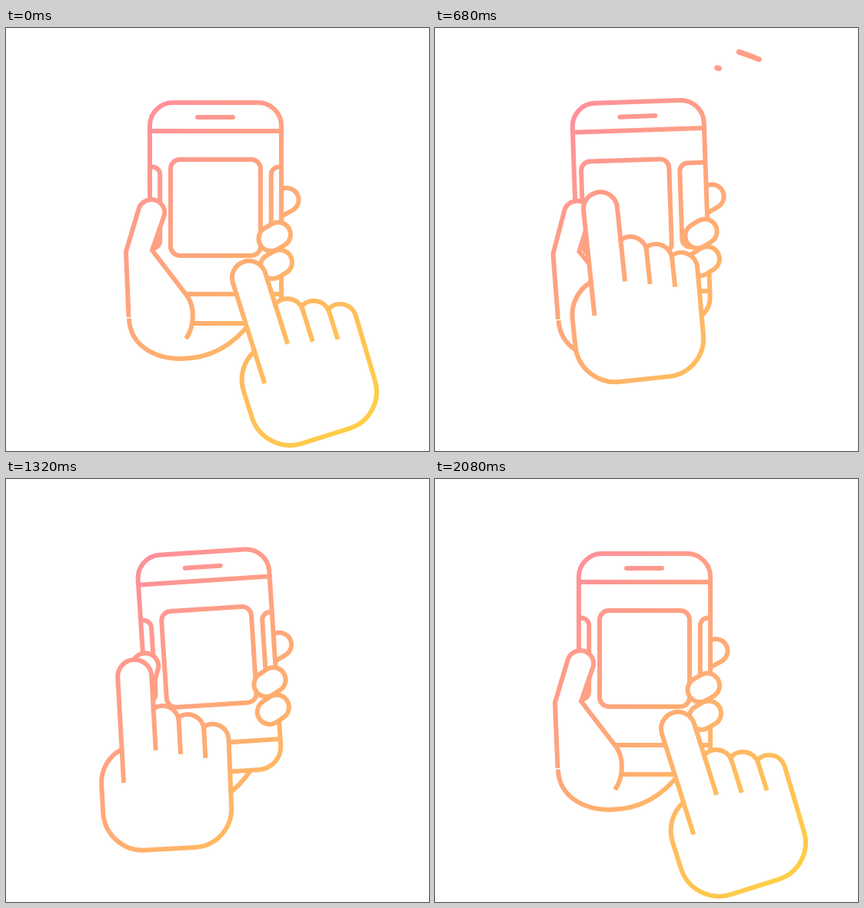
Recreate the animation shown at these times as an HTML page with a canvas. Size 550 px wide and 550 px high, loop 2120 ms.

```html
<!DOCTYPE html>
<html lang="en">
<head>
<meta charset="utf-8">
<title>Swipe</title>
<style>
  html, body { margin: 0; width: 100%; height: 100%; overflow: hidden; background: #fff; }
  canvas { display: block; width: 550px; height: 550px; }
</style>
</head>
<body>
<canvas id="stage" width="550" height="550"></canvas>
<script>
const ctx = document.getElementById('stage').getContext('2d');
const SIZE = 550, STEP = 40, STEPS = 53;

// Pointing hand, upright, with the fingertip centre at the origin
const hand = new Path2D(
  'M-22 0A22 22 0 0 1 22 0V43A21 21 0 0 1 54 61V56A21 21 0 0 1 86 74V70' +
  'A21 21 0 0 1 117.5 88L116 176A50 50 0 0 1 66 226H1A52 52 0 0 1 -51 174V138' +
  'A49 49 0 0 1 -22 93.3Z');
const creases = new Path2D('M-22 90V137M22 40V97M54 58V104M86 72V111');
const HAND_PIVOT = [33, 150];

// Holding hand
const thumb = new Path2D(
  'M159.5 376L156 291L173 234A17.2 17.2 0 0 1 206 243L190 289L236 349C246 364 245 388 234 404');
const palm = new Path2D('M160 377.5C161 412 192 430 227 430C265 430 296 413 320 380');
const PHONE_PIVOT = [236, 363];

// [step, pivot x, pivot y, degrees]
const handKeys = [
  [0, 392.6, 458, -17.5], [9, 382, 398, 6.7], [12, 380, 386, 11.3],
  [17, 263.5, 381, -6], [23, 187, 404, -17.5], [29, 187, 404, -17.5],
  [37, 256.5, 407.3, 11], [42, 387, 435, -6.5], [44, 391.6, 443.3, -13.2],
  [48, 392.5, 455, -17], [52, 392.6, 458, -17.5]
];
// [step, degrees]
const phoneKeys = [[0, 0], [13, 0], [17, -2], [23, -5], [29, -5], [37, -2], [44, -0.6], [52, 0]];

const rad = deg => deg * Math.PI / 180;

function ease(time, start, end) {
  const t = Math.min(1, Math.max(0, (time - start) / (end - start)));
  return t * t * (3 - 2 * t);
}

// Monotone cubic through the keys
function sample(keys, time, col) {
  const slope = i => (keys[i + 1][col] - keys[i][col]) / (keys[i + 1][0] - keys[i][0]);
  const tangent = i => {
    if (i === 0 || i === keys.length - 1) return 0;
    const a = slope(i - 1), b = slope(i);
    return a * b > 0 ? 2 * a * b / (a + b) : 0;
  };
  let i = 0;
  while (i < keys.length - 2 && time >= keys[i + 1][0]) i++;
  const span = keys[i + 1][0] - keys[i][0];
  const t = (time - keys[i][0]) / span, u = 1 - t;
  return keys[i][col] * u * u * (1 + 2 * t) + keys[i + 1][col] * t * t * (3 - 2 * t) +
    span * t * u * (u * tangent(i) - t * tangent(i + 1));
}

function shape(path) {
  ctx.fill(path);
  ctx.stroke(path);
}

function line(x1, y1, x2, y2) {
  ctx.beginPath();
  ctx.moveTo(x1, y1);
  ctx.lineTo(x2, y2);
  ctx.stroke();
}

function box(x, y, w, h, r) {
  const path = new Path2D();
  path.roundRect(x, y, w, h, r);
  return path;
}

function finger(x1, y1, x2, y2, r) {
  const a = Math.atan2(y2 - y1, x2 - x1), q = Math.PI / 2;
  const path = new Path2D();
  path.arc(x2, y2, r, a - q, a + q);
  path.arc(x1, y1, r, a + q, a + 3 * q);
  path.closePath();
  shape(path);
}

function drawCards(progress) {
  ctx.save();
  ctx.beginPath();
  ctx.rect(187, 134, 171, 212);
  ctx.clip();
  for (let i = -1; i <= 2; i++) {
    const pos = i - progress;
    const s = 1 - 0.15 * Math.min(1, Math.abs(pos));
    const w = 117 * s, h = 125 * s;
    shape(box(272.5 + 122 * pos - w / 2, 233.5 - h / 2, w, h, 12 * s));
  }
  ctx.restore();
}

function drawPhone(time) {
  const [px, py] = PHONE_PIVOT;
  const body = box(187, 97, 171, 287, 30);
  ctx.save();
  ctx.translate(px, py);
  ctx.rotate(rad(sample(phoneKeys, time, 1)));
  ctx.translate(-px, -py);
  finger(352, 230.5, 365, 223.5, 15.5);
  shape(palm);
  ctx.fill(body);
  drawCards(ease(time, 14, 26));
  ctx.stroke(body);
  line(187, 134, 358, 134);
  line(187, 346, 358, 346);
  ctx.lineCap = 'round';
  line(249, 116, 295, 116);
  ctx.lineCap = 'butt';
  shape(thumb);
  finger(346.5, 310, 356, 304.5, 16);
  finger(344.5, 274, 354, 268.5, 16);
  ctx.restore();
}

// Streak along an arch; angles are measured from straight up
function streak(radius, from, to, head, tail) {
  if (head <= tail) return;
  const angle = p => rad(from + (to - from) * p - 90);
  ctx.save();
  ctx.lineWidth = 7;
  ctx.lineCap = 'round';
  ctx.beginPath();
  ctx.arc(270, 411, radius, angle(head), angle(tail));
  ctx.stroke();
  ctx.restore();
}

function drawHand(time) {
  ctx.save();
  ctx.translate(sample(handKeys, time, 1), sample(handKeys, time, 2));
  ctx.rotate(rad(sample(handKeys, time, 3)));
  ctx.translate(-HAND_PIVOT[0], -HAND_PIVOT[1]);
  shape(hand);
  ctx.stroke(creases);
  ctx.restore();
}

const tint = ctx.createLinearGradient(125, 125, 500, 500);
tint.addColorStop(0, 'rgb(255,140,160)');
tint.addColorStop(1, 'rgb(255,208,66)');

function draw(time) {
  ctx.globalCompositeOperation = 'source-over';
  ctx.fillStyle = '#fff';
  ctx.strokeStyle = '#000';
  ctx.lineWidth = 6;
  ctx.fillRect(0, 0, SIZE, SIZE);
  drawPhone(time);
  streak(400, 23.6, -27.9, ease(time, 15, 25), ease(time, 15.7, 29));
  streak(372, 15.5, -20, ease(time, 16.3, 27), ease(time, 17, 28));
  drawHand(time);
  // Black lines take the gradient, white stays white
  ctx.globalCompositeOperation = 'screen';
  ctx.fillStyle = tint;
  ctx.fillRect(0, 0, SIZE, SIZE);
}

const start = performance.now();
function tick() {
  const elapsed = Math.max(0, performance.now() - start);
  draw(Math.floor(elapsed / STEP) % STEPS);
  requestAnimationFrame(tick);
}
tick();
</script>
</body>
</html>
```
